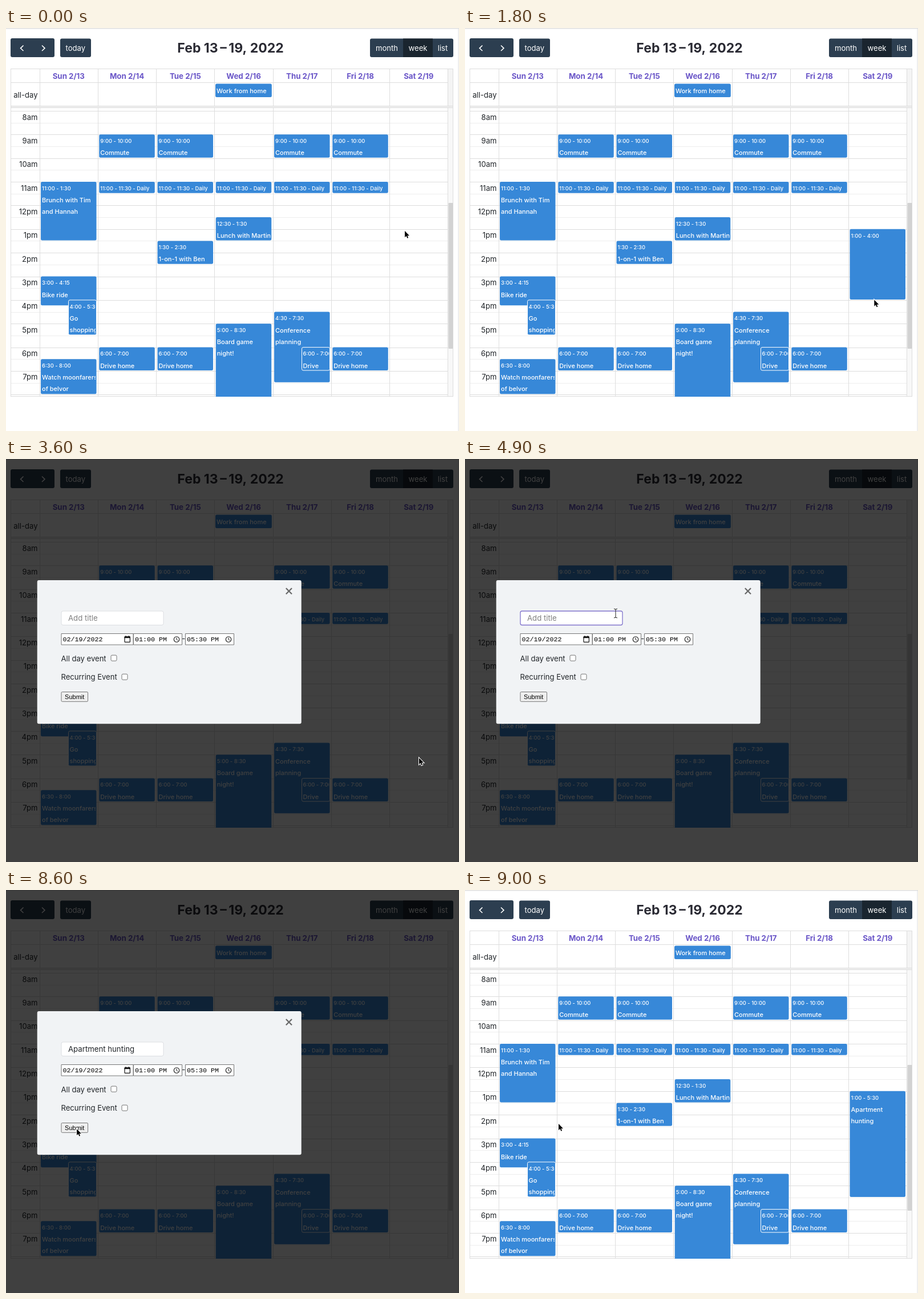
These frames come from a looping animation (794x705 px, 9.1 s). An HTML page with a canvas:

```html
<!DOCTYPE html>
<html lang="en">
<head>
<meta charset="utf-8">
<title>Week calendar</title>
<style>
html, body { margin: 0; width: 100%; height: 100%; overflow: hidden; background: #fff; }
canvas { display: block; }
</style>
</head>
<body>
<canvas id="stage" width="794" height="705"></canvas>
<script>
const ctx = document.getElementById('stage').getContext('2d');
const LOOP = 9100, STEP = 100;
const OPEN = 3600, FOCUS = 4300, TYPE = 5600, REAPPEAR = 7800, BLUR = 8600, CLOSE = 8700;
const DRAG = 300;
const SANS = 'Inter, sans-serif', MONO = '"Liberation Mono", monospace';
const BLUE = '#3788d8', LINE = '#ddd', INK = '#212529';
const COL = 102.25, HOUR = 41.36, EVENT_W = 97.5;

const colX = day => 61 + day * COL;
const hourY = h => 145 + (h - 8) * HOUR;

// day, start, end, title lines, left offset for overlapping events
const events = [
  [0, 11, 13.5, ['Brunch with Tim', 'and Hannah']],
  [0, 15, 16.25, ['Bike ride']],
  [0, 16, 17.5, ['Go', 'shopping'], 48.5],
  [0, 18.5, 20, ['Watch moonfarers', 'of belvor']],
  [2, 13.5, 14.5, ['1-on-1 with Ben']],
  [3, 12.5, 13.5, ['Lunch with Martin']],
  [3, 17, 20.5, ['Board game', 'night!']],
  [4, 16.5, 19.5, ['Conference', 'planning']],
  ...[1, 2, 4, 5].map(d => [d, 9, 10, ['Commute']]),
  ...[1, 2, 3, 4, 5].map(d => [d, 11, 11.5, ['Daily']]),
  ...[1, 2, 5].map(d => [d, 18, 19, ['Drive home']]),
  [4, 18, 19, ['Drive'], 48.5]
];

// time, x, y of the pointer
const path = [
  [0, 699, 355], [100, 699, 355], [300, 700, 359], [1000, 716, 459], [1100, 716, 459],
  [1400, 716.5, 473], [1500, 716.5, 473], [1600, 717, 475], [1700, 717, 475],
  [1800, 717.3, 475.5], [2000, 719, 482], [2300, 719, 482], [3200, 724, 523],
  [3600, 724, 523], [4300, 262, 273], [4400, 262, 273], [4600, 264, 270],
  [7700, 264, 270], [8200, 124, 418], [8600, 124, 418], [9000, 164, 409], [LOOP, 164, 409]
];

// time, typed characters
const typing = [
  [5600, 1], [5700, 2], [5800, 3], [5900, 4], [6000, 5], [6300, 6], [6400, 7], [6500, 8],
  [6600, 10], [6700, 11], [6900, 12], [7100, 13], [7200, 14], [7300, 16], [7400, 17]
];

function pointerAt(t) {
  const i = Math.max(1, path.findIndex(k => k[0] >= t));
  const [t0, x0, y0] = path[i - 1], [t1, x1, y1] = path[i];
  const u = (t - t0) / (t1 - t0), e = u * u * (3 - 2 * u);
  return { x: x0 + (x1 - x0) * e, y: y0 + (y1 - y0) * e };
}

function text(str, x, y, font, color, align = 'left') {
  ctx.font = font;
  ctx.fillStyle = color;
  ctx.textAlign = align;
  ctx.fillText(str, x, y);
}

function box(x, y, w, h, r, fill, stroke, lw = 1) {
  ctx.beginPath();
  ctx.roundRect(x, y, w, h, r);
  if (fill) { ctx.fillStyle = fill; ctx.fill(); }
  if (stroke) { ctx.strokeStyle = stroke; ctx.lineWidth = lw; ctx.stroke(); }
}

function rect(x, y, w, h, color) {
  ctx.fillStyle = color;
  ctx.fillRect(x, y, w, h);
}

function lines(pts, color, lw) {
  ctx.beginPath();
  pts.forEach(([x, y], i) => i ? ctx.lineTo(x, y) : ctx.moveTo(x, y));
  ctx.strokeStyle = color;
  ctx.lineWidth = lw;
  ctx.stroke();
}

function clock(h) {
  const m = Math.round(h % 1 * 60);
  return ((Math.floor(h) + 11) % 12 + 1) + ':' + String(m).padStart(2, '0');
}

function drawEvent([day, start, end, title, inset = 0]) {
  const x = colX(day) + inset, y = hourY(start);
  const w = EVENT_W - inset, h = hourY(end) - y - 1;
  const small = '500 9.4px ' + SANS, normal = '500 11px ' + SANS;
  const time = clock(start) + ' - ' + clock(end);
  box(x, y, w, h, 2.5, BLUE, inset ? '#fff' : null);
  ctx.save();
  ctx.beginPath();
  ctx.rect(x, y, w - 1.5, h);
  ctx.clip();
  if (end - start <= 0.5) {
    text(time + (title.length ? ' - ' + title[0] : ''), x + 2, y + 14.6, small, '#fff');
  } else {
    text(time, x + 2, y + 14.8, small, '#fff');
    title.forEach((s, i) => text(s, x + 2, y + 36 + i * 20, normal, '#fff'));
  }
  ctx.restore();
}

function drawToolbar() {
  const font = '13.1px ' + SANS;
  box(8, 18, 77, 33, 3, '#2c3e50');
  lines([[30.5, 30.5], [25.5, 35.3], [30.5, 40]], '#fff', 1.6);
  lines([[63, 30.5], [68, 35.3], [63, 40]], '#fff', 1.6);
  box(95, 18.5, 54, 32.5, 3, '#2c3e50');
  text('today', 121.8, 39.5, font, '#fff', 'center');
  box(638, 18.5, 146, 32.5, 3, '#2c3e50');
  rect(696, 18.5, 52, 32.5, '#1a252f');
  [['month', 667.5], ['week', 722], ['list', 765.5]].forEach(([s, x]) =>
    text(s, x, 39.5, font, '#fff', 'center'));
  text('Feb 13\u2009\u2013\u200919, 2022', 393.5, 43, 'bold 23px ' + SANS, '#2a2a33', 'center');
}

function drawGrid() {
  const font = '13.1px ' + SANS;
  rect(775, 72, 9, 64, '#f4f4f4');
  rect(775, 139, 9, 506, '#f8f8f8');
  for (let h = 8; h <= 20; h += 0.5) {
    rect(8, Math.round(hourY(h)), 767, 1, h % 1 ? '#eee' : LINE);
    if (h % 1 === 0 && h < 20) {
      text((h + 11) % 12 + 1 + (h < 12 ? 'am' : 'pm'), 55.5, hourY(h) + 15.5, font, INK, 'right');
    }
  }
  for (let i = 0; i <= 7; i++) rect(Math.round(58.6 + i * COL), 71, 1, 574, LINE);
  rect(8, 95, 767, 1, LINE);
  rect(8, 136, 776, 4, '#efefef');
  rect(8, 136, 776, 1, LINE);
  rect(8, 139, 776, 1, LINE);
  ctx.strokeStyle = LINE;
  ctx.lineWidth = 1;
  ctx.strokeRect(8.5, 71.5, 775, 573);
  box(775.5, 306, 8, 255, 1, '#d2d2d2');
  ['Sun', 'Mon', 'Tue', 'Wed', 'Thu', 'Fri', 'Sat'].forEach((d, i) =>
    text(`${d} 2/${13 + i}`, colX(i) + 48.8, 88.5, 'bold 13.3px ' + SANS, '#6a56c8', 'center'));
  text('all-day', 55.5, 122, font, INK, 'right');
  box(367, 97.5, 98.8, 23.5, 2.5, BLUE);
  text('Work from home', 369, 113.5, '500 11px ' + SANS, '#fff');
}

function drawCalendar(t, pointer) {
  rect(0, 0, 794, 705, '#fff');
  rect(0, 0, 794, 1.5, '#e0e0e0');
  rect(792.5, 0, 1, 705, LINE);
  drawToolbar();
  drawGrid();
  ctx.save();
  ctx.beginPath();
  ctx.rect(8, 140, 767, 505);
  ctx.clip();
  events.forEach(drawEvent);
  if (t >= DRAG && t < OPEN) {
    const slot = Math.floor((pointer.y - hourY(13)) / HOUR * 2) + 1;
    drawEvent([6, 13, 13 + slot / 2, []]);
  } else if (t >= CLOSE) {
    drawEvent([6, 13, 17.5, ['Apartment', 'hunting']]);
  }
  ctx.restore();
}

function caretOn(t) {
  if (t < TYPE) return t < 4900 || t >= 5400;
  return t < 7900 || t >= 8400;
}

function drawTitleField(t) {
  const focused = t >= FOCUS && t < BLUR;
  const font = '13.2px ' + SANS;
  const count = typing.reduce((n, [at, c]) => t >= at ? c : n, 0);
  const value = 'Apartment hunting'.slice(0, count);
  box(97, 266, 179, 24.5, 3, '#fff', focused ? '#8073cc' : '#dcdee2', focused ? 1.3 : 1);
  text(value || 'Add title', 109, 283, font, value ? INK : '#808080');
  if (focused && caretOn(t)) {
    rect(Math.round(109 + (value ? ctx.measureText(value).width : 0)), 270, 1, 16, '#111');
  }
}

function drawClockIcon(x, y) {
  ctx.beginPath();
  ctx.arc(x, y, 4.7, 0, Math.PI * 2);
  ctx.strokeStyle = '#111';
  ctx.lineWidth = 1.1;
  ctx.stroke();
  lines([[x, y - 3], [x, y + 0.3], [x + 2.2, y + 1.8]], '#111', 1);
}

function drawModal(t) {
  const label = '13.05px ' + SANS, mono = '11.7px ' + MONO, edge = '#767676';
  rect(0, 0, 794, 705, 'rgba(0,0,0,0.75)');
  box(54.7, 212, 463, 251.3, 3, '#f1f3f5');
  lines([[490.8, 226], [501, 236.2]], '#6a6a6a', 2.3);
  lines([[501, 226], [490.8, 236.2]], '#6a6a6a', 2.3);
  drawTitleField(t);

  box(97, 305.5, 126, 19.5, 0, '#fff', edge);
  box(223.5, 305.5, 85, 19.5, 0, '#fff', edge);
  box(314.5, 305.5, 85, 19.5, 0, '#fff', edge);
  text('02/19/2022', 99.5, 319.2, mono, '#000');
  text('01:00 PM', 226, 319.2, mono, '#000');
  text('05:30 PM', 317, 319.2, mono, '#000');
  text('-', 311.3, 319, label, INK, 'center');
  box(208, 311, 9.4, 9.4, 1, null, '#111', 1.2);
  rect(207.6, 310.4, 10.2, 2.8, '#111');
  rect(209.4, 309, 1.2, 2, '#111');
  rect(214.8, 309, 1.2, 2, '#111');
  drawClockIcon(299, 315.5);
  drawClockIcon(390, 315.5);

  text('All day event', 96.5, 353.5, label, INK);
  box(184, 343.2, 10, 10, 2, '#fff', edge);
  text('Recurring Event', 96.5, 386.3, label, INK);
  box(203, 376.2, 10, 10, 2, '#fff', edge);
  box(97, 407.5, 46.5, 16.8, 1.5, '#efefef', edge);
  text('Submit', 120.2, 419.7, '11px "Liberation Sans", sans-serif', '#000', 'center');
}

function drawArrow({ x, y }) {
  ctx.save();
  ctx.translate(x, y);
  ctx.beginPath();
  [[0, 0], [0, 11.2], [2.6, 8.8], [4.3, 12.8], [6.1, 12], [4.4, 8.2], [8, 8.2]]
    .forEach(p => ctx.lineTo(...p));
  ctx.closePath();
  ctx.strokeStyle = '#fff';
  ctx.lineWidth = 2;
  ctx.stroke();
  ctx.fillStyle = '#000';
  ctx.fill();
  ctx.restore();
}

function drawBeam({ x, y }) {
  lines([[x, y - 7], [x, y + 7]], '#222', 1);
  lines([[x - 3, y - 8], [x, y - 7], [x + 3, y - 8]], '#222', 1);
  lines([[x - 3, y + 8], [x, y + 7], [x + 3, y + 8]], '#222', 1);
}

function draw(t) {
  const pointer = pointerAt(t);
  const open = t >= OPEN && t < CLOSE;
  drawCalendar(t, pointer);
  if (open) drawModal(t);
  if (t >= TYPE && t < REAPPEAR) return;
  const { x, y } = pointer;
  const overField = open && x > 97 && x < 276 && y > 266 && y < 291;
  (overField ? drawBeam : drawArrow)(pointer);
}

const begin = performance.now();
function frame() {
  const t = (performance.now() - begin) % LOOP;
  draw(Math.floor(t / STEP) * STEP);
  requestAnimationFrame(frame);
}
frame();
</script>
</body>
</html>
```
